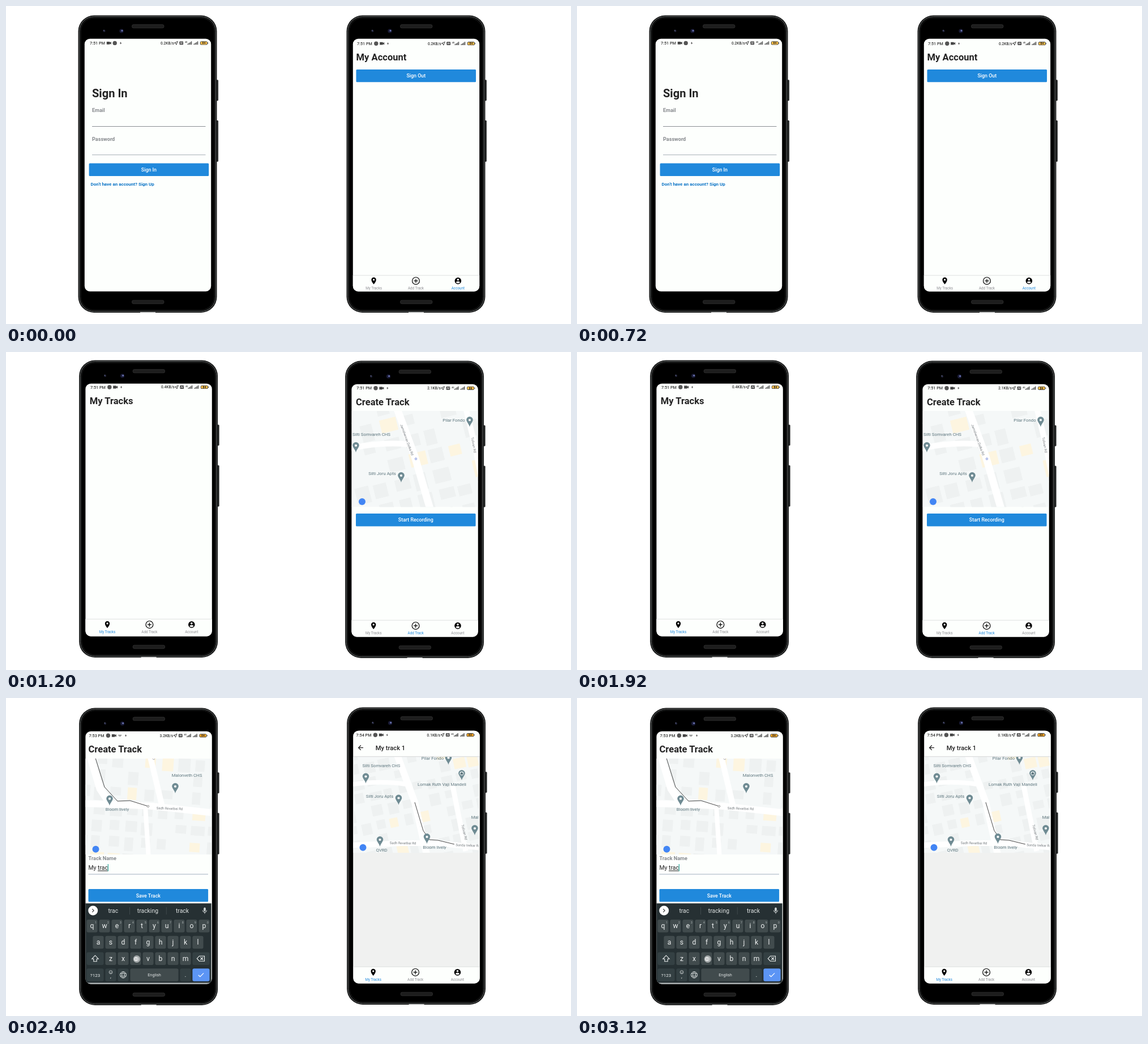
Recreate the animation shown at these times as an HTML page. Size 998x561 px, loop 3600 ms.

```html
<!DOCTYPE html>
<html lang="en">
<head>
<meta charset="utf-8">
<title>Track app screens</title>
<style>
  html, body { margin: 0; width: 100%; height: 100%; overflow: hidden; background: #fff; }
  svg { display: block; width: 998px; height: 561px; font-family: Roboto, sans-serif; }
  .scene { visibility: hidden; animation: show 3.6s step-end infinite; }
  .scene:nth-of-type(2) { animation-delay: -2.4s; }
  .scene:nth-of-type(3) { animation-delay: -1.2s; }
  @keyframes show {
    0% { visibility: visible; }
    33.3333%, 100% { visibility: hidden; }
  }
</style>
</head>
<body>
<svg id="stage" viewBox="0 0 998 561" xmlns="http://www.w3.org/2000/svg">
  <defs>
    <clipPath id="glass"><rect x="138.8" y="57.7" width="223.4" height="445.8" rx="9.5"/></clipPath>
    <g id="phone">
      <g fill="#202222" stroke="#4a4c4c" stroke-width=".6">
        <rect x="370" y="130.5" width="4.8" height="36.5" rx="1.2"/>
        <rect x="370" y="202" width="4.8" height="72.5" rx="1.2"/>
      </g>
      <rect x="127.5" y="16.5" width="245" height="524.5" rx="28" fill="#161717"/>
      <rect x="129.7" y="18.7" width="240.6" height="520.1" rx="26" fill="#050505" stroke="#666969"/>
      <rect x="132" y="21" width="236" height="515.5" rx="24" stroke="#1d1e1e"/>
      <path d="M237 540.6h27" stroke="#d4d4d4" stroke-width="1.2"/>
      <g fill="#1d1d1d" stroke="#343434" stroke-width=".8">
        <rect x="222.5" y="32.8" width="56.5" height="6" rx="2.6"/>
        <rect x="222.5" y="519.2" width="56.5" height="6" rx="2.6"/>
      </g>
      <circle cx="173.5" cy="44" r="2" fill="#24263c"/>
      <circle cx="172.8" cy="43" r=".8" fill="#7c80a4"/>
      <circle cx="204" cy="44" r="3.6" fill="#1a1c38"/>
      <circle cx="205" cy="43.6" r="1.5" fill="#6f78b4"/>
      <rect x="138.8" y="57.7" width="223.4" height="445.8" rx="9.5" fill="#fdfffd"/>
    </g>
    <g id="pin">
      <path d="M0 10.2C-.8 6-5.8.8-5.8-2.2a5.8 5.8 0 0 1 11.6 0C5.8.8.8 6 0 10.2z" fill="#6f8b93"/>
      <circle cy="-2" r="2.1" fill="#fff"/>
    </g>
    <path id="place" fill-rule="evenodd" d="M0 6.2C-2.2 3.4-4.2.5-4.2-2a4.2 4.2 0 0 1 8.4 0C4.2.5 2.2 3.4 0 6.2zM0-3.6a1.6 1.6 0 1 0 0 3.2 1.6 1.6 0 1 0 0-3.2z"/>
    <path id="plus" d="M-6.4 0a6.4 6.4 0 1 0 12.8 0 6.4 6.4 0 1 0-12.8 0M-3.5 0h7M0-3.5v7" fill="none" stroke="#000" stroke-width="1.2"/>
    <g id="user">
      <circle r="5.8"/>
      <circle cy="-2.2" r="1.8" fill="#fff"/>
      <path d="M-3.5 2.5C-3 .2 3 .2 3.5 2.5A4.2 4.2 0 0 1-3.5 2.5z" fill="#fff"/>
    </g>
    <circle id="badge" r="3.7" fill="#555"/>
    <path id="cam" d="M-4-2.4h5.6v1.6L4-2.4v4.8L1.6.8v1.6H-4z" fill="#444"/>
    <path id="keys" d="M-3-.8h6M-2 .9h4" stroke="#666"/>
    <path id="bolt" d="M.6-2.8L-1.6.5H0L-.6 2.8 1.6-.5H0z" fill="#333"/>
  </defs>
</svg>
<script>
const BLUE = '#2089dc', INK = '#222', GREY = '#86898d', SLATE = '#5c757d';

const text = (x, y, size, str, fill = INK, weight = 400, anchor = 'start') =>
  `<text x="${x}" y="${y}" font-size="${size}" fill="${fill}" font-weight="${weight}" text-anchor="${anchor}">${str}</text>`;
const mid = (x, y, size, str, fill, weight) => text(x, y, size, str, fill, weight, 'middle');
const rect = (x, y, w, h, fill, r = 0) =>
  `<rect x="${x}" y="${y}" width="${w}" height="${h}" rx="${r}" fill="${fill}"/>`;
const line = (d, stroke, w = 1) => `<path d="${d}" fill="none" stroke="${stroke}" stroke-width="${w}"/>`;
const dot = (x, y, r, fill, more = '') => `<circle cx="${x}" cy="${y}" r="${r}" fill="${fill}" ${more}/>`;
const use = (id, x, y) => `<use href="#${id}" x="${x}" y="${y}"/>`;
const at = (x, y, body, turn = 0) => `<g transform="translate(${x} ${y}) rotate(${turn})">${body}</g>`;
const loop = (n, draw) => Array.from({ length: n }, (_, i) => draw(i)).join('');

const phone = (dx, dy, body) => use('phone', dx, dy) +
  `<g transform="translate(${dx} ${dy})" clip-path="url(#glass)">${at(-dx, -dy, body)}</g>`;

const title = (x, y, str, size = 16.55) => text(x, y, size, str, INK, 700);
const button = (x, y, str) => rect(x, y, 211.6, 22.4, BLUE, 1.5) + mid(x + 105.8, y + 14.4, 8.9, str, '#fff', 500);
const field = (y, str, x = 152) => text(x, y, 9.1, str, GREY, 700);

const bars = x => loop(4, i => rect(x + i * 2.1, 1.2 - i * 1.4, 1.4, 1.6 + i * 1.4, '#444'));

function status(x, y, time, speed, icons = 'badge cam bolt', charge = 84, fill = '#fbc04a') {
  return at(x, y,
    text(0, 2.5, 7.2, time, '#333', 500) +
    icons.split(' ').map((id, i) => use(id, 33.8 + i * 10.4, 0)).join('') +
    text(125, 2.3, 6.6, speed + 'KB/s', '#333', 500) +
    line('M149.4-.2l6-2.8-2.6 6-.9-2.6z', '#333', .9) +
    rect(158.3, -2.9, 6.8, 5.8, '#444', 1) + line('M159.6 1.4l1.6-3 1.2 3 1.6-3', '#fff', .8) +
    text(168, -.2, 3.4, '4G', '#444', 700) + bars(172.5) + bars(183.5) +
    rect(194.8, -3.1, 13.2, 6.2, '#444', 2.6) + rect(195.6, -2.3, 11.6, 4.6, fill, 1.8) +
    rect(208.2, -1, 1, 2, '#444') + mid(201.4, 1.8, 5, charge, '#222', 700));
}

function tabs(x, y, active) {
  const items = [['place', 'My Tracks'], ['plus', 'Add Track'], ['user', 'Account']];
  return rect(x - 40, y, 230, 40, '#fdfffd') + line(`M${x - 40} ${y}h230`, '#d8dada', .8) +
    items.map(([icon, name], i) => at(x + i * 74.4, y,
      use(icon, 0, 9.7) + mid(0, 25.3, 6.3, name, i === active ? BLUE : '#8e8e93'))).join('');
}

// Each place keeps its label at a fixed offset from its pin.
const PLACES = {
  hall: ['Pilar Fondo', -28, 1.4],
  homes: ['Silti Somvareh CHS', 27.5, -18.7],
  flats: ['Silti Joru Apts', -33.5, -2.9],
  tower: ['Malonveth CHS', 20.5, -18.7],
  shop: ['Bloom lively', 13.5, 19],
  office: ['QVRD', 3, 19],
  temple: ['Lomak Ruth Vaji Mandeli', -35, 19.7]
};
function spot(x, y, id) {
  const [name, dx, dy] = PLACES[id];
  return use('pin', x, y) + mid(x + dx, y + dy, 7.8, name, SLATE);
}
const road = (d, w = 10) => line(d, '#fff', w);
const street = (x, y, turn, str) => at(x, y, mid(0, 2, 6, str, '#777d80'), turn);
const ring = (x, y, fill, stroke) => dot(x, y, 1.7, fill, `stroke="${stroke}" stroke-width=".9"`);

// Buildings: a jittered grid, turned to follow the streets.
function town(w, h, turn, pitch, seed) {
  const rand = () => (seed = seed * 16807 % 2147483647) / 2147483647;
  let out = '';
  for (let y = -h * .7; y < h * .7; y += pitch)
    for (let x = -w * .7; x < w * .7; x += pitch) {
      const size = () => pitch * (.5 + rand() * .35);
      const fill = rand() < .12 ? '#fdf5e0' : '#eef1f1';
      if (rand() < .75) out += rect(x + rand() * 4, y + rand() * 4, size(), size(), fill);
    }
  return at(w / 2, h / 2, out, turn);
}

function map(id, x, y, { turn, pitch, seed }, body) {
  const w = 223, h = 169.4;
  return `<clipPath id="${id}">${rect(x, y, w, h)}</clipPath>
    <g clip-path="url(#${id})">${rect(x, y, w, h, '#f5f8f8')}${at(x, y, town(w, h, turn, pitch, seed))}${body}
    ${dot(x + 18.5, y + 160, 6, '#4285f4')}</g>`;
}

const mapCreate = map('create', 610.5, 104, { turn: -14, pitch: 36, seed: 4711 },
  road('M605 171Q660 158 712 163') + road('M690 98L722 184 750 280', 13) + road('M812 98L829 168 838 215') +
  spot(819, 122, 'hall') + spot(618, 167, 'homes') + spot(698, 220, 'flats') +
  street(708, 155, 70, 'Jamshervan Dolka Rd') + street(826, 164, 79, 'Tolivan Rd') +
  ring(724, 188.5, '#dfe5fb', '#7f92d6'));

const mapSave = map('save', 140, 106.7, { turn: 4, pitch: 29, seed: 9203 },
  road('M130 186L200 188 260 191 370 203', 12) + road('M148 100L166 160 186 190', 13) +
  road('M254 100L276 192') + road('M246 190L252 285', 8) +
  line('M158 106L174 157 197 182 219 181 251 191', '#333', .9) +
  ring(251, 191, '#fff', '#888') + ring(261, 107, '#fff', '#aaa') +
  spot(183, 179.7, 'shop') + spot(299, 158, 'tower') + street(289, 195, 2, 'Sadh Revatbai Rd'));

const mapTrack = map('track', 612, 103.7, { turn: -12, pitch: 26, seed: 6007 },
  road('M605 260L700 256 760 256 840 264') + road('M690 98L722 184 744 280', 12) +
  road('M788 150L812 270', 9) + road('M605 153Q660 145 706 152', 8) +
  line('M722 184L737 234 748 250 763 251 792 258', '#333', .9) +
  spot(781.5, 107.5, 'hall') + spot(635.5, 140.5, 'homes') + spot(693.5, 178.5, 'flats') + spot(805, 135, 'temple') +
  spot(743.5, 247, 'shop') + spot(828, 232, 'tower') + spot(660.5, 252, 'office') +
  dot(805, 133, 3.6, '#dde5e7') + `<path d="M802.7 135v-2l2.3-2.5 2.3 2.5v2z" fill="${SLATE}"/>` +
  street(701, 256, 1, 'Sadh Revatbai Rd') + street(816, 260, 2, 'Sunda Velkar Rd') + street(809.5, 237, 76, 'Tolivan Rd'));

function keyboard() {
  const PLAIN = '#414b4d', DARK = '#344043', PALE = '#eef1f1';
  const icon = (d, w = 1.1) => line(d, PALE, w);
  // One grid step is 22 by 28.75; each key's content is drawn about its centre.
  const key = (col, row, span, fill, body) => {
    const w = span * 22 - 2.8;
    return at(142.4 + col * 22 + w / 2, 402.2 + row * 28.75, rect(-w / 2, -11.3, w, 22.6, fill, 3) + body);
  };
  const letters = (str, col, row) => [...str].map((c, i) => key(col + i, row, 1, PLAIN,
    mid(0, 3.8, 12.2, c, PALE) + (row ? '' : mid(6.4, -4.7, 4.8, (i + 1) % 10, '#b4bcbc')))).join('');
  const words = ['trac', 'tracking', 'track'];
  return rect(139, 362.3, 223.6, 140.4, '#263033') + rect(139, 502.7, 225, 3, '#aeb4b5') +
    dot(153.7, 375, 8.5, '#fff') + line('M152.3 372.2l2.8 2.8-2.8 2.8', '#333', 1.1) +
    words.map((w, i) => mid(189.3 + i * 61.1, 379.2, 10.4, w, '#dfe3e3')).join('') +
    line('M218.5 369v13M283.3 369v13', '#465053', .8) +
    rect(349.2, 369.6, 3.6, 6.6, '#cfd5d5', 1.8) + icon('M347.5 374.5a3.5 3.5 0 0 0 7 0M351 378v2.6', .9) +
    letters('qwertyuiop', 0, 0) + letters('asdfghjkl', .5, 1) + letters('zxcvbnm', 1.5, 2) +
    dot(231, 460.5, 6.4, '#fff', 'opacity=".5"') + dot(231, 460.5, 3.8, '#fff', 'opacity=".4"') +
    key(0, 2, 1.5, DARK, icon('M0-5.5l-5.7 6h3v4.6h5.4V.5h3z')) +
    key(8.5, 2, 1.5, DARK, icon('M-3-4.5h9v9h-9L-7.2 0zM-1-2.3l4.6 4.6M3.6-2.3L-1 2.3')) +
    key(0, 3, 1.5, DARK, mid(0, 3.1, 8, '?123', PALE)) +
    key(1.5, 3, 1, DARK, dot(0, -4.7, 2.9, 'none', `stroke="${PALE}" stroke-width=".7"`) +
      icon('M-1.5-4q1.5 1.6 3 0M-1-5.7v.6M1-5.7v.6', .6) + mid(0, 5.5, 9, ',', PALE)) +
    key(2.5, 3, 1, DARK, dot(0, 0, 5.5, 'none', `stroke="${PALE}" stroke-width=".9"`) +
      icon('M0-5.5c-3.4 3-3.4 8 0 11c3.4-3 3.4-8 0-11M-5-2H5M-5 2H5', .8)) +
    key(3.5, 3, 4, PLAIN, mid(0, 2.6, 7.3, 'English', '#dfe3e3')) +
    key(7.5, 3, 1, DARK, mid(0, 4, 11, '.', PALE)) +
    key(8.5, 3, 1.5, '#5c95f5', line('M-4.7.3l3 3 6.3-6.4', '#fff', 1.2));
}

const signIn = status(148, 65.4, '7:51 PM', '0.2', 'cam badge bolt') +
  title(152, 161, 'Sign In', 20.1) +
  field(187.3, 'Email') + line('M152 212.5h200.5', '#7d8288', .9) +
  field(237.5, 'Password') + line('M152 262.6h200.5', '#a0a8b0', .9) +
  button(146.6, 277.6, 'Sign In') +
  text(149.5, 317, 8, "Don't have an account? Sign Up", '#0b74c6', 700);

const account = status(620, 66.2, '7:51 PM', '0.2') +
  title(618.6, 96.2, 'My Account') + button(618.5, 111.9, 'Sign Out') + tabs(649.6, 475.2, 2);

const tracks = status(149, 62, '7:51 PM', '0.4') + title(147.8, 92, 'My Tracks') + tabs(179, 471.2, 0);

const create = status(619.2, 63.8, '7:51 PM', '2.1') +
  title(618, 93.8, 'Create Track') + mapCreate + button(618, 285, 'Start Recording') + tabs(649.2, 473.2, 1);

const save = status(146.6, 66.3, '7:53 PM', '3.2', 'badge cam keys bolt', 84, '#f5a623') +
  title(145.5, 96.2, 'Create Track') + mapSave + field(285.6, 'Track Name', 145.5) +
  text(145.5, 303.4, 10.4, 'My <tspan text-decoration="underline">trac</tspan>') +
  line('M180.3 293v12.5', '#159a8c', 1.1) + line('M145.5 310.9h211.5', '#98a6b8', .9) +
  button(145.5, 337.1, 'Save Track') + keyboard();

const detail = rect(613, 103, 226, 372, '#f0f1f0') + mapTrack +
  rect(613, 57, 226, 46, '#fdfffd') + line('M613 103.3h226', '#d2d4d4', .9) +
  status(618.6, 65.2, '7:54 PM', '0.1', 'badge cam bolt', 83, '#f5a623') +
  line('M631 87.7h-8M626.8 83.5l-4.2 4.2 4.2 4.2', INK, 1.3) +
  text(652.7, 91.9, 11.2, 'My track 1', INK, 500) + tabs(648.7, 474.2, 0);

const scenes = [
  phone(0, 0, signIn) + phone(474, 0, account),
  phone(1.6, -2, tracks) + phone(471.6, -1, create),
  phone(1.6, 1, save) + phone(474.6, 0, detail)
];
document.getElementById('stage').insertAdjacentHTML('beforeend',
  scenes.map(s => `<g class="scene">${s}</g>`).join(''));
</script>
</body>
</html>
```
